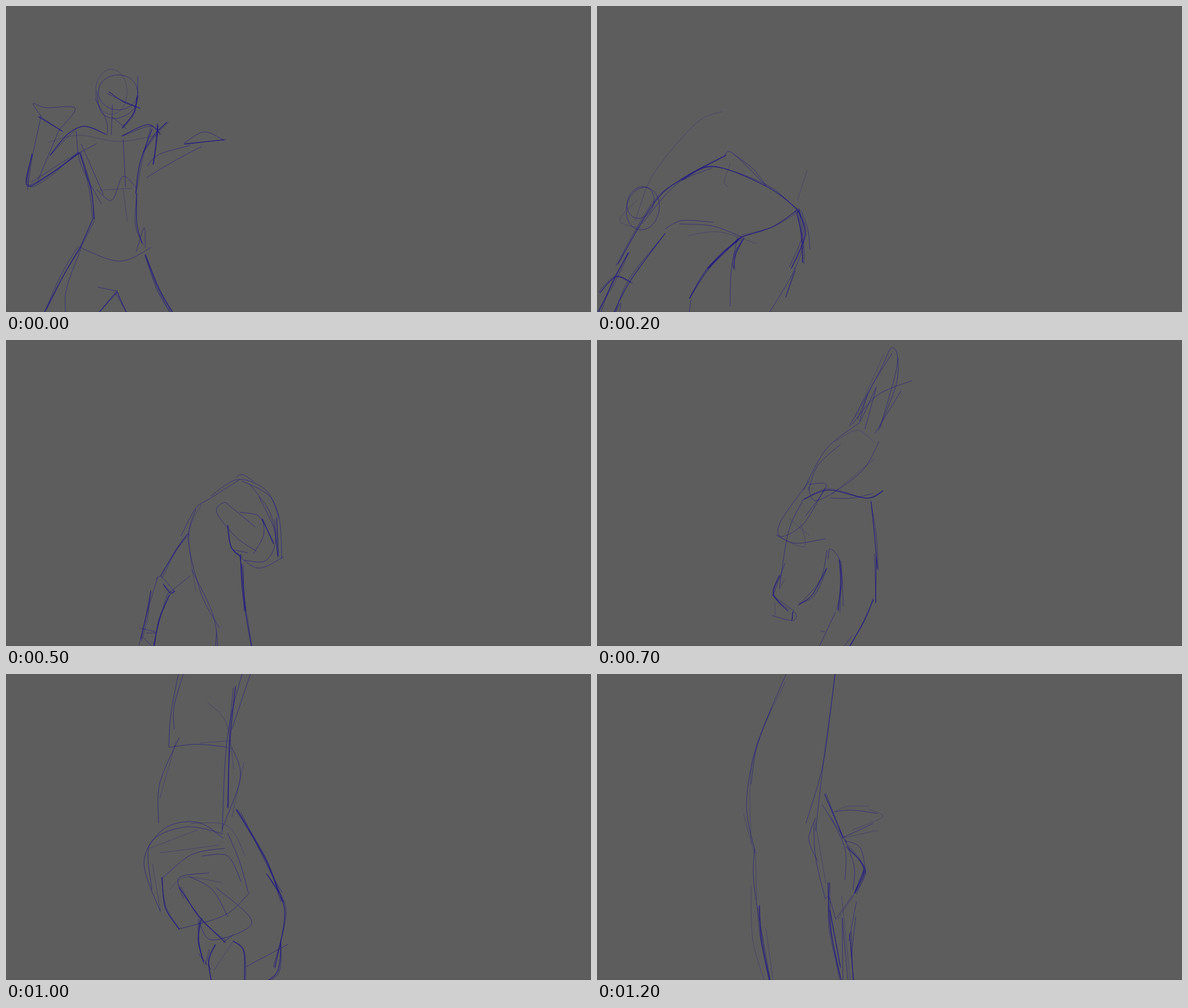
Animation, 1033 px wide and 542 px high, one loop 1.3 s. Source, as an HTML page:

```html
<!DOCTYPE html>
<html lang="en">
<head>
<meta charset="utf-8">
<title>Figure tumble sketch</title>
<style>
html, body { margin: 0; width: 100%; height: 100%; overflow: hidden; background: #5d5d5d; }
svg { display: block; width: 100%; height: 100%; }
path { fill: none; stroke: #1b1287; stroke-linecap: round; stroke-linejoin: round; }
</style>
</head>
<body>
<svg viewBox="0 0 1033 542">
  <rect width="1033" height="542" fill="#5d5d5d"/>
  <rect y="541" width="1033" height="1" fill="#575757"/>
  <g id="figure">
    <path stroke-width=".75" stroke-opacity=".42"/>
    <path stroke-width=".85" stroke-opacity=".68"/>
    <path stroke-width="1.1" stroke-opacity=".88"/>
  </g>
</svg>
<script>
let seed = 7;
let layers;

function random() {
  seed = (seed * 16807) % 2147483647;
  return seed / 2147483647;
}
const wobble = v => v + (random() - .5) * 7;

// Smooth curve through the points x, y, x, y, ...
function curve(n) {
  const last = n.length / 2 - 1;
  const at = i => { const k = 2 * Math.max(0, Math.min(last, i)); return [n[k], n[k + 1]]; };
  let d = `M${at(0)}`;
  for (let i = 0; i < last; i++) {
    const [a, b, c, e] = [at(i - 1), at(i), at(i + 1), at(i + 2)];
    const out = b.map((v, k) => v + (c[k] - a[k]) / 6);
    const into = c.map((v, k) => v - (e[k] - b[k]) / 6);
    d += `C${out} ${into} ${c}`;
  }
  return d;
}

// The more passes, the darker the line; zero is a faint one.
function ink(passes, ...points) {
  layers[Math.min(2, passes)] += curve(points);
  for (let i = 1; i < passes; i++) layers[1] += curve(points.map(wobble));
}

function oval(passes, cx, cy, rx, ry, tilt = 0) {
  const points = [];
  for (let i = 0; i <= 12; i++) {
    const a = i * Math.PI / 6, x = rx * Math.cos(a), y = ry * Math.sin(a);
    points.push(cx + x * Math.cos(tilt) - y * Math.sin(tilt), cy + x * Math.sin(tilt) + y * Math.cos(tilt));
  }
  ink(passes, ...points);
}

function shrug() {
  oval(1, 198, 153, 35, 31);
  oval(0, 186, 152, 28, 40);
  ink(1, 160, 150, 168, 188, 196, 199, 228, 178, 233, 125);
  ink(2, 182, 152, 206, 169, 236, 181);
  ink(3, 232, 160, 225, 190, 205, 216);
  ink(1, 188, 175, 186, 228);
  ink(1, 158, 165, 177, 203, 179, 226);
  ink(1, 188, 197, 212, 217);
  // shoulders and arms
  ink(2, 78, 264, 110, 226, 140, 213, 176, 227);
  ink(0, 75, 241, 130, 229, 200, 240, 275, 227);
  ink(2, 205, 230, 250, 210, 272, 226);
  ink(1, 62, 195, 48, 173, 70, 180, 122, 181, 94, 219);
  ink(2, 57, 196, 100, 222);
  ink(1, 62, 195, 46, 270, 38, 325);
  ink(1, 94, 219, 56, 310);
  ink(3, 46, 263, 37, 318, 75, 300, 130, 260);
  ink(1, 45, 312, 106, 273, 160, 244);
  ink(3, 268, 209, 266, 240, 260, 281);
  ink(2, 284, 206, 262, 228, 242, 259);
  ink(1, 250, 283, 270, 263, 325, 247);
  ink(1, 248, 304, 300, 273, 345, 249);
  ink(1, 314, 243, 350, 223, 385, 238);
  ink(2, 315, 244, 385, 237);
  // trunk
  ink(1, 124, 222, 132, 280, 168, 350);
  ink(3, 130, 260, 150, 325, 156, 378);
  ink(1, 133, 245, 172, 334);
  ink(1, 207, 236, 211, 320);
  ink(2, 258, 218, 236, 280, 229, 333);
  ink(1, 160, 325, 187, 344, 206, 302, 230, 322);
  ink(0, 166, 326, 222, 323);
  ink(0, 207, 325, 214, 380);
  ink(2, 231, 332, 231, 385, 240, 420);
  ink(2, 153, 378, 130, 430);
  ink(1, 127, 426, 200, 452, 256, 428);
  ink(1, 246, 428, 244, 393, 230, 435);
  // legs
  ink(3, 129, 430, 100, 480, 68, 542);
  ink(1, 132, 430, 107, 500, 105, 542);
  ink(4, 246, 440, 270, 500, 294, 542);
  ink(1, 162, 498, 196, 505);
  ink(2, 196, 506, 212, 542);
  ink(2, 196, 507, 165, 542);
}

function dive() {
  oval(1, 77, 348, 23, 29, .4);
  oval(1, 81, 359, 29, 38, .2);
  ink(0, 72, 343, 40, 380, 78, 394);
  ink(0, 68, 380, 100, 297, 175, 208, 221, 187);
  // back
  ink(2, 37, 457, 100, 350, 150, 306, 228, 264);
  ink(1, 80, 385, 140, 316, 203, 287);
  ink(2, 150, 308, 205, 284, 300, 320, 354, 360);
  ink(1, 225, 265, 240, 261, 300, 320);
  ink(1, 242, 263, 275, 288, 298, 317);
  ink(0, 235, 280, 225, 310, 232, 321);
  ink(0, 354, 344, 371, 291);
  // belly
  ink(1, 120, 395, 150, 380, 205, 383);
  ink(1, 146, 386, 205, 390, 260, 411);
  ink(0, 160, 407, 215, 400, 282, 421);
  ink(2, 255, 409, 310, 391, 354, 361);
  // arms
  ink(3, 3, 542, 30, 485, 55, 437);
  ink(2, 5, 508, 33, 480, 60, 490);
  ink(2, 30, 542, 60, 485, 120, 403);
  ink(1, 33, 542, 42, 526, 40, 540);
  // legs
  ink(4, 255, 410, 225, 435, 196, 465);
  ink(3, 250, 412, 195, 465, 163, 518);
  ink(1, 163, 542, 166, 520);
  ink(1, 248, 410, 237, 470, 235, 532);
  ink(3, 259, 412, 245, 440, 241, 465);
  ink(3, 353, 360, 361, 410, 363, 454);
  ink(3, 355, 362, 367, 405, 343, 465);
  ink(1, 360, 362, 372, 395, 376, 430);
  ink(1, 365, 425, 345, 475, 305, 542);
  ink(1, 350, 465, 333, 516, 350, 470);
}

function crouch() {
  ink(1, 309, 347, 335, 298, 360, 281, 413, 247);
  ink(1, 362, 276, 410, 247, 460, 267, 482, 315);
  ink(1, 407, 243, 417, 238, 437, 250);
  ink(1, 417, 250, 465, 276, 483, 320, 487, 388);
  ink(1, 430, 255, 468, 310, 480, 385);
  ink(1, 447, 278, 476, 345, 460, 390, 420, 390);
  ink(2, 478, 315, 481, 383);
  ink(1, 490, 384, 445, 404, 403, 375);
  // folded arm
  ink(1, 440, 331, 400, 298, 385, 288, 372, 305, 405, 348, 442, 374);
  ink(1, 413, 305, 448, 313, 455, 345, 437, 378);
  ink(2, 452, 317, 473, 360);
  ink(2, 391, 328, 397, 366, 415, 385);
  ink(1, 403, 372, 427, 377);
  // trunk and legs
  ink(0, 345, 291, 323, 345, 335, 445);
  ink(1, 335, 300, 322, 355, 345, 450, 377, 510);
  ink(1, 328, 407, 365, 485, 374, 542);
  ink(1, 370, 542, 372, 515);
  ink(2, 414, 380, 418, 450, 433, 542);
  ink(2, 416, 396, 423, 480);
  // reaching arm
  ink(2, 321, 343, 300, 372, 273, 418);
  ink(1, 325, 418, 285, 450);
  ink(1, 265, 425, 274, 419, 298, 446);
  ink(2, 278, 433, 290, 448, 298, 445);
  ink(1, 268, 420, 250, 480, 235, 540);
  ink(2, 256, 445, 247, 490, 238, 530);
  ink(3, 288, 452, 271, 495, 261, 542);
  ink(1, 236, 510, 266, 518, 248, 519);
  ink(1, 238, 522, 257, 542);
}

function kick() {
  // raised leg
  ink(1, 365, 265, 405, 193, 463, 147);
  ink(1, 446, 152, 497, 60, 520, 14, 530, 45, 500, 155);
  ink(0, 456, 137, 506, 26);
  ink(1, 460, 140, 485, 82, 521, 24);
  ink(1, 532, 32, 528, 80, 497, 160);
  ink(1, 491, 165, 537, 90);
  ink(1, 450, 150, 495, 98, 556, 72);
  ink(1, 493, 83, 464, 145, 478, 95);
  ink(1, 473, 158, 493, 85);
  // trunk and head
  ink(1, 374, 265, 390, 222, 430, 185);
  ink(0, 420, 180, 460, 160, 490, 182);
  ink(1, 498, 180, 465, 235, 390, 284, 373, 260);
  ink(0, 490, 210, 415, 273);
  ink(1, 374, 256, 405, 258, 368, 312);
  ink(1, 375, 250, 325, 320, 325, 348, 365, 325, 402, 263);
  ink(2, 365, 282, 410, 266, 475, 280, 505, 267);
  ink(1, 412, 280, 450, 280, 487, 272);
  ink(1, 362, 287, 338, 340, 322, 440);
  ink(0, 322, 440, 331, 425);
  ink(1, 317, 345, 350, 360, 403, 352);
  ink(0, 340, 317, 375, 346);
  ink(0, 360, 325, 366, 366, 320, 348);
  // arms
  ink(1, 332, 395, 311, 452);
  ink(2, 322, 417, 311, 450, 337, 480);
  ink(1, 309, 452, 349, 482, 345, 497, 309, 488);
  ink(2, 346, 481, 344, 497);
  ink(0, 314, 465, 315, 487);
  ink(1, 406, 373, 394, 425, 355, 471);
  ink(2, 405, 405, 381, 450, 358, 468);
  ink(1, 408, 388, 412, 370, 430, 395, 435, 472);
  ink(3, 428, 390, 430, 430, 426, 479);
  // standing leg
  ink(2, 484, 287, 490, 345, 495, 405);
  ink(2, 493, 380, 492, 465);
  ink(2, 488, 460, 470, 500, 447, 542);
  ink(1, 437, 542, 450, 524);
  ink(1, 421, 482, 393, 542);
  ink(1, 395, 515, 402, 517);
}

function twist() {
  ink(1, 330, 158, 340, 126, 365, 114, 377, 152);
  ink(2, 370, 127, 376, 152);
  ink(1, 333, 130, 338, 124, 336, 133);
  ink(1, 315, 206, 342, 148, 370, 145, 401, 194);
  ink(1, 388, 165, 398, 193);
  ink(1, 395, 103, 396, 110);
  ink(1, 325, 220, 340, 194, 382, 184);
  ink(0, 371, 196, 388, 192, 404, 205);
  ink(0, 320, 255, 326, 222, 350, 198);
  ink(1, 408, 205, 407, 235);
  ink(0, 420, 185, 413, 245);
  // chest
  ink(3, 412, 202, 440, 197, 470, 223, 473, 265);
  ink(2, 472, 245, 468, 277);
  ink(1, 325, 285, 350, 248, 420, 249, 468, 258);
  ink(0, 330, 290, 350, 254, 385, 256);
  ink(0, 432, 257, 468, 268);
  ink(1, 326, 236, 324, 290, 336, 352);
  ink(1, 333, 365, 336, 410, 318, 480);
  ink(1, 466, 295, 437, 368);
  ink(1, 457, 330, 437, 370);
  ink(0, 432, 290, 432, 330, 438, 365);
  // hips
  ink(0, 335, 372, 380, 356, 440, 368);
  ink(1, 345, 370, 306, 425, 312, 480, 337, 502);
  ink(0, 307, 393, 303, 460);
  ink(2, 298, 448, 310, 478, 338, 503);
  ink(1, 337, 505, 345, 462, 373, 455);
  ink(1, 378, 449, 366, 480, 374, 542);
  ink(1, 340, 470, 345, 505, 368, 523);
  // legs
  ink(2, 439, 400, 437, 470, 411, 542);
  ink(1, 449, 400, 443, 470, 415, 542);
  ink(3, 443, 372, 458, 450, 445, 542);
  ink(1, 458, 387, 461, 490, 456, 542);
  ink(1, 455, 370, 448, 380);
  ink(1, 475, 430, 475, 456);
  ink(1, 500, 433, 502, 439);
  // hand
  ink(1, 254, 476, 215, 500, 212, 518);
  ink(1, 225, 490, 197, 524, 246, 514);
  ink(2, 186, 518, 204, 540);
  ink(1, 200, 514, 206, 540);
  ink(2, 220, 517, 246, 519, 226, 538);
  ink(1, 222, 520, 241, 542);
}

function handstand() {
  // legs
  ink(1, 313, 0, 297, 80, 293, 138);
  ink(1, 323, 0, 302, 70, 302, 110);
  ink(1, 293, 140, 340, 135, 390, 140);
  ink(1, 419, 0, 390, 120, 381, 280);
  ink(1, 434, 0, 397, 110);
  ink(2, 403, 39, 394, 130, 390, 240);
  ink(0, 357, 66, 388, 100, 400, 176);
  ink(0, 345, 133, 396, 129);
  ink(1, 397, 140, 411, 190, 381, 275);
  ink(0, 417, 165, 397, 255);
  ink(1, 310, 124, 278, 200, 276, 265);
  ink(0, 305, 130, 278, 225);
  // hips
  ink(1, 279, 412, 252, 330, 285, 275, 340, 264, 382, 290);
  ink(1, 265, 375, 262, 300, 320, 272, 382, 283);
  ink(0, 330, 266, 390, 270, 419, 320);
  ink(0, 262, 307, 340, 277);
  ink(0, 278, 315, 375, 302);
  ink(1, 282, 357, 330, 318, 385, 307);
  ink(1, 348, 320, 390, 320, 412, 362);
  ink(1, 390, 282, 410, 330, 424, 380);
  ink(0, 279, 410, 266, 333);
  // trunk
  ink(2, 282, 355, 287, 405, 310, 441);
  ink(1, 309, 441, 385, 418, 427, 380);
  ink(1, 327, 354, 365, 376, 390, 420);
  ink(1, 359, 348, 310, 356, 317, 390);
  ink(0, 295, 375, 320, 355, 380, 364);
  ink(2, 310, 372, 345, 422, 386, 463);
  ink(1, 343, 430, 365, 459, 430, 430, 372, 373);
  ink(1, 383, 463, 400, 450);
  // arms
  ink(3, 404, 243, 452, 325, 480, 395);
  ink(1, 412, 248, 460, 345, 480, 380);
  ink(2, 455, 350, 484, 410, 468, 505);
  ink(1, 421, 503, 490, 466);
  ink(2, 478, 460, 470, 515, 421, 541);
  ink(3, 345, 426, 342, 460, 350, 495);
  ink(1, 342, 482, 363, 508);
  ink(2, 366, 542, 359, 495, 370, 467);
  ink(0, 367, 510, 400, 460);
  ink(2, 400, 461, 417, 480, 417, 542);
  ink(1, 353, 500, 360, 475);
}

function stretch() {
  ink(1, 334, 0, 283, 125, 264, 230, 280, 318);
  ink(1, 308, 60, 282, 130, 272, 195);
  ink(0, 332, 15, 275, 150, 272, 300);
  ink(0, 259, 248, 278, 318);
  ink(1, 278, 310, 278, 380, 306, 542);
  ink(0, 280, 320, 282, 400);
  ink(0, 272, 375, 275, 470, 295, 542);
  ink(3, 287, 410, 290, 470, 304, 542);
  ink(0, 298, 450, 311, 542);
  ink(1, 420, 0, 400, 155, 369, 264);
  ink(1, 421, 0, 400, 155, 386, 278);
  ink(1, 386, 255, 374, 293, 390, 332);
  ink(1, 383, 265, 386, 325, 403, 398);
  ink(0, 385, 260, 404, 370);
  // arm and hand
  ink(2, 402, 213, 435, 290);
  ink(1, 398, 232, 442, 300);
  ink(1, 413, 255, 438, 310, 438, 364);
  ink(1, 437, 292, 454, 340, 452, 382);
  ink(0, 418, 246, 440, 235, 480, 234);
  ink(1, 420, 244, 450, 241, 495, 247);
  ink(0, 480, 240, 504, 253, 452, 276);
  ink(1, 434, 290, 487, 265);
  ink(0, 436, 290, 496, 277);
  ink(1, 437, 295, 465, 308, 475, 355);
  ink(3, 442, 306, 471, 345, 455, 388);
  ink(2, 472, 345, 455, 388);
  ink(1, 455, 388, 423, 432);
  ink(0, 425, 435, 453, 393);
  // lower arms
  ink(1, 403, 398, 410, 397, 422, 435);
  ink(3, 408, 370, 412, 450, 431, 542);
  ink(2, 411, 418, 430, 520);
  ink(1, 433, 432, 443, 542);
  ink(1, 433, 433, 434, 542);
  ink(0, 432, 393, 447, 542);
  ink(1, 458, 403, 445, 472);
  ink(1, 457, 430, 449, 500);
  ink(2, 446, 460, 453, 542);
}

function drawing(pose, move = '') {
  layers = ['', '', ''];
  seed = 7;
  pose();
  return { d: layers, move };
}

const drawings = [
  drawing(shrug),
  drawing(shrug, 'rotate(-11 180 542) translate(-14 -18) scale(1.08)'),
  drawing(dive),
  drawing(dive, 'translate(80 6) rotate(-6 240 542)'),
  drawing(crouch, 'translate(-22 -2) rotate(-4 370 542)'),
  drawing(crouch),
  drawing(kick, 'translate(-8 10) rotate(-5 420 542)'),
  drawing(kick),
  drawing(twist, 'translate(6 -16) scale(1.03)'),
  drawing(twist),
  drawing(handstand, 'translate(-26 -20) scale(1.07)'),
  drawing(handstand),
  drawing(stretch)
];

const HOLD = 100;
const figure = document.getElementById('figure');
const paths = [...figure.children];
let shown = -1;

function render(ms) {
  const index = Math.floor(ms / HOLD) % drawings.length;
  if (index === shown) return;
  shown = index;
  const { d, move } = drawings[index];
  figure.setAttribute('transform', move);
  paths.forEach((path, i) => path.setAttribute('d', d[i]));
}

const start = performance.now();
function tick() {
  render(performance.now() - start);
  requestAnimationFrame(tick);
}
tick();
</script>
</body>
</html>
```
